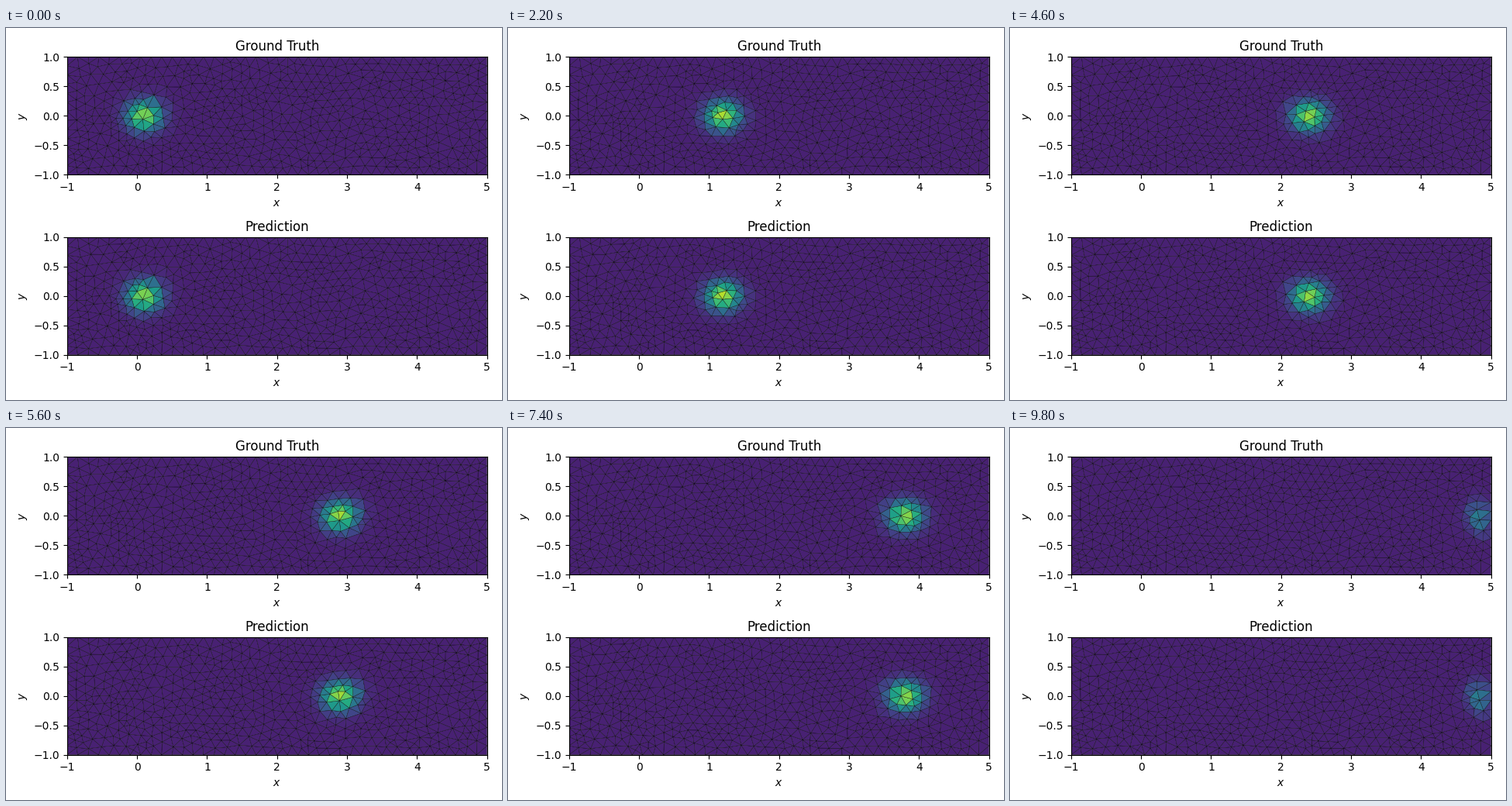
Animation, 640 px wide and 480 px high, one loop 10000 ms. Source, as a matplotlib script:

```python
import numpy as np
import matplotlib.pyplot as plt
from matplotlib.animation import FuncAnimation
from matplotlib.tri import Triangulation

X0, X1, Y0, Y1 = -1.0, 5.0, -1.0, 1.0
STEP = 0.15
FRAMES = 50
rng = np.random.default_rng(7)


def boundary_nodes():
    xs = np.linspace(X0, X1, 41)
    ys = np.linspace(Y0, Y1, 14)[1:-1]
    return np.vstack([
        np.column_stack([xs, np.full_like(xs, Y0)]),
        np.column_stack([xs, np.full_like(xs, Y1)]),
        np.column_stack([np.full_like(ys, X0), ys]),
        np.column_stack([np.full_like(ys, X1), ys]),
    ])


def build_mesh(inner=560, tries=25, rounds=3):
    """Evenly scattered nodes, relaxed a little and joined by Delaunay."""
    edge = boundary_nodes()
    nb = len(edge)
    pts = np.empty((nb + inner, 2))
    pts[:nb] = edge
    pad = STEP / 2
    for i in range(nb, nb + inner):
        cand = rng.uniform((X0 + pad, Y0 + pad), (X1 - pad, Y1 - pad), (tries, 2))
        gap = ((cand[:, None] - pts[None, :i]) ** 2).sum(2).min(1)
        pts[i] = cand[gap.argmax()]
    for _ in range(rounds):
        a, b = Triangulation(*pts.T).edges.T
        total, count = np.zeros_like(pts), np.zeros(len(pts))
        for p, q in ((a, b), (b, a)):
            np.add.at(total, p, pts[q])
            np.add.at(count, p, 1)
        pts[nb:] += 0.5 * (total[nb:] / count[nb:, None] - pts[nb:])
    return Triangulation(*pts.T), nb


mesh, n_edge = build_mesh()
node_error = 0.02 * rng.standard_normal(len(mesh.x))


def exact(i):
    cx = 0.1 * (i + 1)
    u = np.exp(-20 * ((mesh.x - cx) ** 2 + mesh.y ** 2))
    u[:n_edge] = 0
    return u


def predicted(i):
    return exact(i) * (1 + node_error)


fig, axes = plt.subplots(2, 1, figsize=(6.4, 4.8), dpi=100)
panels = []
for ax, title, field in zip(axes, ("Ground Truth", "Prediction"), (exact, predicted)):
    faces = ax.tripcolor(mesh, field(0), cmap="viridis", vmin=-0.1, vmax=1.0,
                         edgecolors="k")
    ax.set(title=title, xlabel="$x$", ylabel="$y$", xlim=(X0, X1), ylim=(Y0, Y1))
    panels.append((faces, field))
fig.tight_layout()


def update(i):
    for faces, field in panels:
        faces.set_array(field(i)[mesh.triangles].mean(axis=1))
    return [faces for faces, _ in panels]


anim = FuncAnimation(fig, update, frames=FRAMES, interval=200, repeat=True,
                     repeat_delay=0)
plt.show()
```
